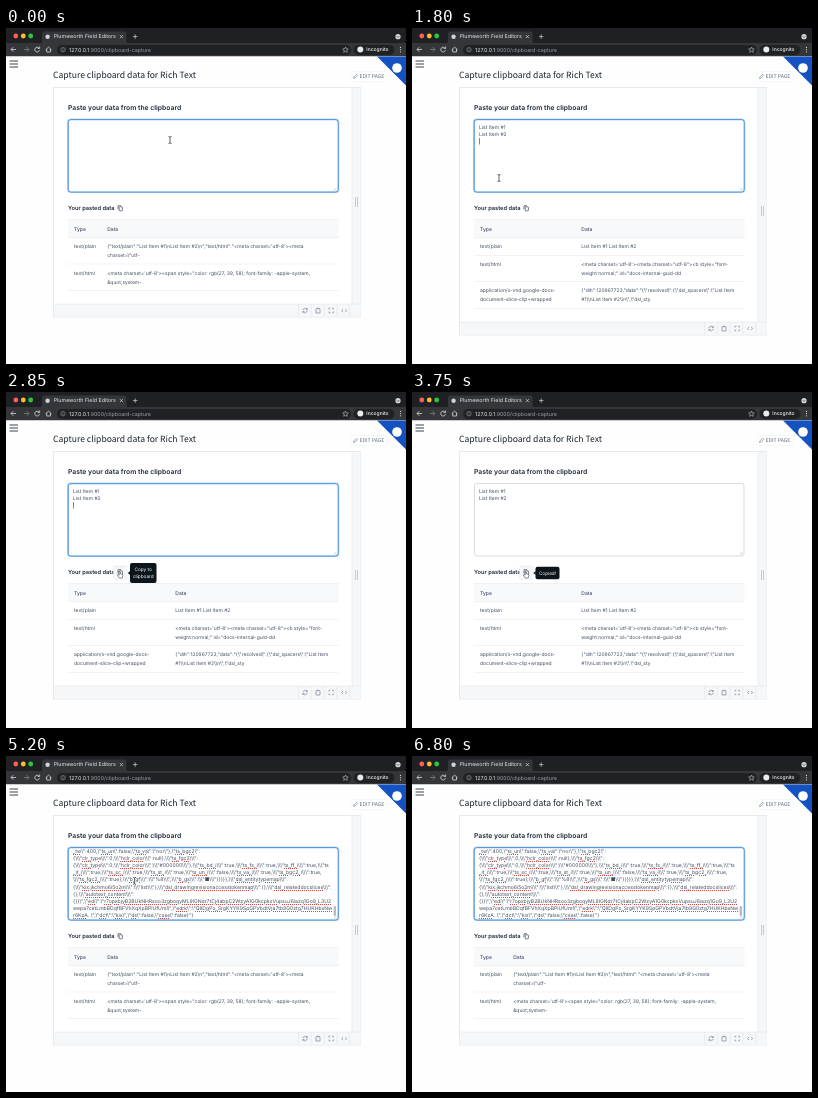
An HTML page that plays this animation: 400 px wide and 336 px high, repeating every 6.85 s.

```html
<!DOCTYPE html>
<html lang="en">
<head>
<meta charset="utf-8">
<title>Clipboard capture</title>
<style>
  html, body { margin: 0; width: 100%; height: 100%; overflow: hidden; background: #fefefe; }
  svg { position: absolute; left: 0; top: 0; }
  text, #dump { font-family: Inter, "Open Sans", sans-serif; text-rendering: geometricPrecision; }
  .title { font-family: "Noto Sans CJK JP", "Noto Sans CJK SC", "Noto Sans CJK", "Noto Sans", sans-serif; font-weight: 500; }
  #dump { position: absolute; left: 67px; top: 93px; width: 259px; height: 70px; overflow: hidden;
    font-size: 5.1px; color: #414d63; white-space: pre; }
  #dump div { position: absolute; line-height: 7px; }
  #dump u { text-decoration: underline dotted #e0443e .6px; text-underline-offset: .5px; }
</style>
</head>
<body>
<svg id="stage" width="400" height="336" viewBox="0 0 400 336" fill="none"></svg>
<div id="dump"></div>
<svg id="top" width="400" height="336" viewBox="0 0 400 336" fill="none"></svg>
<script>
const LOOP = 6850;
const INK = '#1b273a', BODY = '#414d63', LINE = '#dfe5ea', ICON = '#68768a';
const $ = id => document.getElementById(id);
const esc = s => s.replace(/&/g, '&amp;').replace(/</g, '&lt;');

// y is the vertical middle of the line of text
const text = (x, y, size, str, fill = BODY, extra = '') =>
  `<text x="${x}" y="${y + size * .36}" font-size="${size}" fill="${fill}" ${extra}>${esc(str)}</text>`;
const rect = (x, y, w, h, fill, extra = '') =>
  `<rect x="${x}" y="${y}" width="${w}" height="${h}" fill="${fill}" ${extra}/>`;
const disc = (x, y, r, fill) => `<circle cx="${x}" cy="${y}" r="${r}" fill="${fill}"/>`;
const path = (d, stroke, width = .7, extra = '') =>
  `<path d="${d}" stroke="${stroke}" stroke-width="${width}" ${extra}/>`;
const group = (id, body) => `<g id="${id}">${body}</g>`;

const browser = () =>
  rect(0, 0, 400, 16, '#1f2023') + rect(0, 15, 400, 13.5, '#35363a') +
  disc(9.8, 8, 2.4, '#fe5f57') + disc(17.3, 8, 2.4, '#febc2e') + disc(24.7, 8, 2.4, '#28c840') +
  `<path d="M33 16Q36 16 36 13V6Q36 3.500 38.500 3.500H118Q120.500 3.500 120.500 6V13Q120.500 16 123.500 16Z" fill="#35363a"/>` +
  disc(41.6, 8.7, 2.2, '#cfd2d6') + text(47.7, 8.5, 5.3, 'Plumeworth Field Editors', '#e8eaed') +
  path('M113.900 7.100l3 3m0-3l-3 3M127 8.600h4.400m-2.200-2.200v4.400', '#d5d7da') +
  disc(392, 8.7, 2.6, '#d5d7da') + path('M390.700 8.200l1.300 1.300l1.300-1.300', '#35363a') +
  path('M10 21.500H5m2.300-2.300L5 21.500l2.300 2.300', '#d5d7da', .8) +
  path('M18 21.500h5m-2.300-2.300L23 21.500l-2.300 2.300', '#7c7e82', .8) +
  path('M33 20.100a2.400 2.400 0 1 0 .5 2M33.600 18.500v2h-2', '#d5d7da', .8) +
  path('M39.700 21.700l2.900-2.600 2.900 2.600M40.700 21v3h3.800v-3', '#d5d7da', .8) +
  rect(51, 17, 294, 10, '#202124', 'rx="5"') +
  `<circle cx="57" cy="21.700" r="2.200" stroke="#9aa0a6" stroke-width=".6"/>` + path('M57 21.400v1.500m0-2.600v.6', '#9aa0a6', .6) +
  `<text x="63" y="23.700" font-size="5.300" fill="#e8eaed">127.0.0.1<tspan fill="#9aa0a6">:9000/clipboard-capture</tspan></text>` +
  path('M339.500 19l.8 1.800 2 .2-1.500 1.300.5 2-1.800-1-1.800 1 .5-2-1.500-1.300 2-.2z', '#c4c7cb', .6) +
  rect(347.5, 17, 41, 10, '#202124', 'rx="5"') + disc(354.3, 21.6, 3, '#e8eaed') +
  text(360.3, 21.6, 5, 'Incognito', '#f1f3f4', 'font-weight="500"') +
  [19.4, 21.6, 23.8].map(y => disc(394.5, y, .6, '#d5d7da')).join('');

const page = () =>
  rect(0, 28.5, 400, 308, '#fefefe') +
  path('M3.500 33H12M3.500 36H12M3.500 39H12', '#3b4553', 1) +
  `<path d="M371 28.500H400V57.500Z" fill="#1452c2"/>` + disc(391, 40, 4.8, '#fff') +
  text(47, 47, 8.6, 'Capture clipboard data for Rich Text', '#18212f', 'class="title"') +
  rect(345, 43.5, 36, 10, '#fff', `rx="1.500" stroke="#eef1f4" stroke-width=".6"`) +
  path('M347.500 50.500l.4-1.600 2.700-2.700 1.200 1.200-2.700 2.700z', ICON, .6) +
  text(353.6, 48.4, 5.1, 'EDIT PAGE', '#5a677a', 'class="title"');

const copyIcon = (x, y) =>
  rect(x - .8, y - 1.2, 3.2, 4, '#fff', `rx=".6" stroke="${INK}" stroke-width=".6"`) +
  path(`M${x - 2} ${y + 1.400}V${y - 2.300}H${x + 1}`, INK, .6);

// rows: [middle of first line, type lines, data lines]; rules: row bottoms
function preview(id, bottom, dataX, rows, rules) {
  const y = bottom - 6.500, mid = (59 + bottom) / 2;
  let s = rect(47.5, 59.5, 307, bottom - 59.5, '#fff', `stroke="${LINE}" stroke-width=".8"`) +
    rect(346, 60, 8.5, bottom - 60.5, '#f5f7f9') +
    rect(48, bottom - 13, 306.5, 12.5, '#f5f7f9') +
    path(`M346 60V${bottom - 13}M48 ${bottom - 13}H354.500`, LINE, .6) +
    path([292.5, 305.3, 318.1, 330.9, 343.7].map(x => `M${x} ${bottom - 13}v12.500`).join(''), LINE, .6) +
    path(`M349.500 ${mid - 5}v10m2-10v10`, '#aeb9c4', .7) +
    path(`M297 ${y - .3}a2.200 2.200 0 0 1 4-1m.3-1.200v1.500h-1.500M301.200 ${y + .3}a2.200 2.200 0 0 1-4 1m-.3 1.200v-1.500h1.500`, ICON, .6) +
    path(`M310 ${y - 1.800}h4v4.300h-4zM311.200 ${y - 2.300}h1.600`, ICON, .6) +
    path(`M323 ${y - 1}v-1.300h1.300m1.800 0h1.300v1.300m0 2v1.300h-1.300m-1.800 0h-1.300v-1.300`, ICON, .6) +
    path(`M337 ${y - 1.500}l-1.500 1.500 1.500 1.500m2.200-3l1.500 1.500-1.500 1.500`, ICON, .6);
  s += rect(62, 191.5, 270.5, 18, '#f7f9fa') +
    text(68, 201, 5, 'Type', BODY, 'font-weight="500"') + text(dataX, 201, 5, 'Data', BODY, 'font-weight="500"') +
    path([191.5, 209.5, ...rules].map(r => `M62 ${r}H332.500`).join(''), '#e7ebee', .6);
  for (const [top, types, data] of rows) {
    types.forEach((str, i) => s += text(68, top + i * 9, 5, str));
    data.forEach((str, i) => s += text(dataX, top + i * 9, 4.95, str));
  }
  return group(id, s);
}

const plain = preview('plain', 289, 101.2, [
  [218, ['text/plain'], [String.raw`{"text/plain":"List Item #1\nList Item #2\n","text/html":"<meta charset='utf-8'><meta`, String.raw`charset=\"utf-`]],
  [245, ['text/html'], [`<meta charset='utf-8'><span style="color: rgb(27, 39, 58); font-family: -apple-system,`, '&quot;system-']],
], [236, 262.5]);

const rich = preview('rich', 307, 169.3, [
  [218.5, ['text/plain'], ['List Item #1 List Item #2']],
  [236.2, ['text/html'], [`<meta charset='utf-8'><meta charset="utf-8"><b style="font-`, 'weight:normal;" id="docs-internal-guid-dd']],
  [262.3, ['application/x-vnd.google-docs-', 'document-slice-clip+wrapped'],
    [String.raw`{"dih":120967723,"data":"{\"resolved\":{\"dsl_spacers\":\"List Item`, String.raw`#1\\nList Item #2\\n\",\"dsl_sty`]],
], [227.5, 253.5, 280.5]);

const field = () =>
  text(62, 79.5, 6.8, 'Paste your data from the clipboard', INK, 'font-weight="600"') +
  text(62, 180.3, 5.7, 'Your pasted data', INK, 'font-weight="600"') +
  group('hover', rect(107.5, 174, 13.5, 13.5, '#f5f7f9', `rx="2" stroke="${LINE}" stroke-width=".5"`)) + copyIcon(114, 180) +
  group('blur', rect(62.5, 91.5, 269.5, 72.5, '#fff', 'rx="2.500" stroke="#cfd9e0" stroke-width=".9"')) +
  group('focus', rect(62.2, 91.7, 270, 72.3, '#fff', 'rx="2.500" stroke="#b9d7f5" stroke-width="2.200"') +
    rect(62.2, 91.7, 270, 72.3, '#fff', 'rx="2.500" stroke="#3f8ad8" stroke-width="1"')) +
  path('M327.800 162.500l2.700-2.700m-1 2.700l1-1', '#9aa4af', .5) +
  group('selection', rect(67, 95.3, 28, 14.6, '#a9cdf5') + rect(67, 109.9, 1.3, 7, '#a9cdf5')) +
  group('list', text(67, 99, 5, 'List Item #1') + text(67, 106.3, 5, 'List Item #2')) +
  group('caret', rect(67, 110, .6, 6.5, '#333')) +
  group('thumb', rect(327.7, 150, 2.2, 10, '#b4b6ba', 'rx="1.100"'));

const tip = (id, x, y, w, h, lines) => group(id,
  rect(x, y, w, h, '#0c141c', 'rx="2"') + `<path d="M${x + .2} 179l-2.400 2 2.400 2z" fill="#0c141c"/>` +
  lines.map((str, i) => text(x + w / 2, y + h / 2 + (i - (lines.length - 1) / 2) * 7.5, 4.7, str, '#fff', 'text-anchor="middle"')).join(''));

const beam = 'M-1.500-3.500Q0-3.500 0-2.500Q0-3.500 1.500-3.500M0-2.500V2.500M-1.500 3.500Q0 3.500 0 2.500Q0 3.500 1.500 3.500';
const pointers =
  group('beam', path(beam, '#fff', 1.6) + path(beam, '#222', .7)) +
  group('hand', path('M-1-2.500Q0-3.500 .6-2.300V-.2l2 .5Q3.500 .6 3.300 1.700L2.700 4.600H-.8L-2.900 1.700Q-3 .6-2 .7L-1 1.500Z', '#222', .6, 'fill="#fff" transform="scale(.85)"')) +
  group('arrow', path('M0 0V6.500L1.500 5.200L2.500 7.400L3.500 7L2.500 4.800H4.600Z', '#fff', .5, 'fill="#111"'));

$('stage').innerHTML = browser() + page() + plain + rich + field();
$('top').innerHTML = tip('ask', 124, 171, 26.5, 20, ['Copy to', 'clipboard']) +
  tip('done', 123.5, 174.7, 24, 12.5, ['Copied!']) + group('pointer', pointers);

// ~ stands for a triple-escaped quote, ^ for a single-escaped one
const dumpLines = [
  '_tw^:400,^ts_un^:false,^ts_va^:^nor^},^ts_bgc2^:',
  '{~clr_type~:0,~hclr_color~:null},~ts_fgc2~:',
  '{~clr_type~:0,~hclr_color~:~#000000~},~ts_bd_i~:true,~ts_fs_i~:true,~ts_ff_i~:true,~ts',
  '_it_i~:true,~ts_sc_i~:true,~ts_st_i~:true,~ts_un_i~:false,~ts_va_i~:true,~ts_bgc2_i~:true,',
  '~ts_fgc2_i~:true},~b_gf~:~%8~,~b_gs~:~\u25a0~}}}}},~dsl_entitytypemap~:',
  '{~kix.jkchmo6i5o2m~:~list~},~dsl_drawingrevisionaccesstokenmap~:{},~dsl_relateddocslices~:',
  '{},~autotext_content~:',
  '{}}^,^edi^:^r7opxbjyB2BUkNHRsoo3zgboqyML9lGNdr7tCj4abpC2WzyA1G0kcpkxVupsuJ6iazq1Go9_L3U2',
  'wepa7cetLmbBDqfBFVhXqXpBPlUfUml^,^edrk^:^QIlDgPo_SrgKYYK9SpGPVbdtVja7tb9G0ztg7HUKHbxNw',
  'r6KzA..^,^dct^:^kix^,^ds^:false,^cses^:false}"}',
];
$('dump').innerHTML = dumpLines.map((line, i) => `<div style="top:${i * 7.1}px">` + line
  .replace(/\w*_\w+|kix\.\w+|\b(edi|edrk|dct|kix|ds|cses|r6KzA)\b/g, '<u>$&</u>')
  .replace(/~/g, '\\\\\\"').replace(/\^/g, '\\"') + '</div>').join('');

const moves = [[0, 164, 112], [700, 164, 112], [1500, 87, 150], [1850, 87, 150], [2500, 114, 182],
  [4250, 114, 182], [4650, 119, 127], [5000, 119, 127], [5500, 146, 121], [LOOP, 146, 121]];

function pointerAt(t) {
  const i = moves.findIndex(m => m[0] > t);
  const [t0, x0, y0] = moves[i - 1], [t1, x1, y1] = moves[i];
  const k = (t - t0) / (t1 - t0), e = k * k * (3 - 2 * k);
  return [x0 + (x1 - x0) * e, y0 + (y1 - y0) * e];
}

const show = (id, on) => { $(id).style.display = on ? '' : 'none'; };

function draw() {
  const t = performance.now() % LOOP;
  const between = (a, b) => t >= a && t < b;
  const [x, y] = pointerAt(t);
  const pasted = between(1200, 5200), focused = !between(3350, 4650);
  const overIcon = x > 107 && y > 174, overField = y < 164;
  show('plain', !pasted);
  show('rich', pasted);
  show('list', pasted);
  show('focus', focused);
  show('blur', !focused);
  show('caret', between(1200, 3350));
  show('selection', between(4750, 5200));
  show('hover', overIcon);
  show('ask', between(2550, 3350));
  show('done', between(3350, 4250));
  show('dump', t >= 5200);
  show('thumb', t >= 5200);
  show('beam', overField);
  show('hand', overIcon);
  show('arrow', !overField && !overIcon);
  show('pointer', t < 6300);
  $('pointer').setAttribute('transform', `translate(${x} ${y})`);
  requestAnimationFrame(draw);
}
draw();
</script>
</body>
</html>
```
